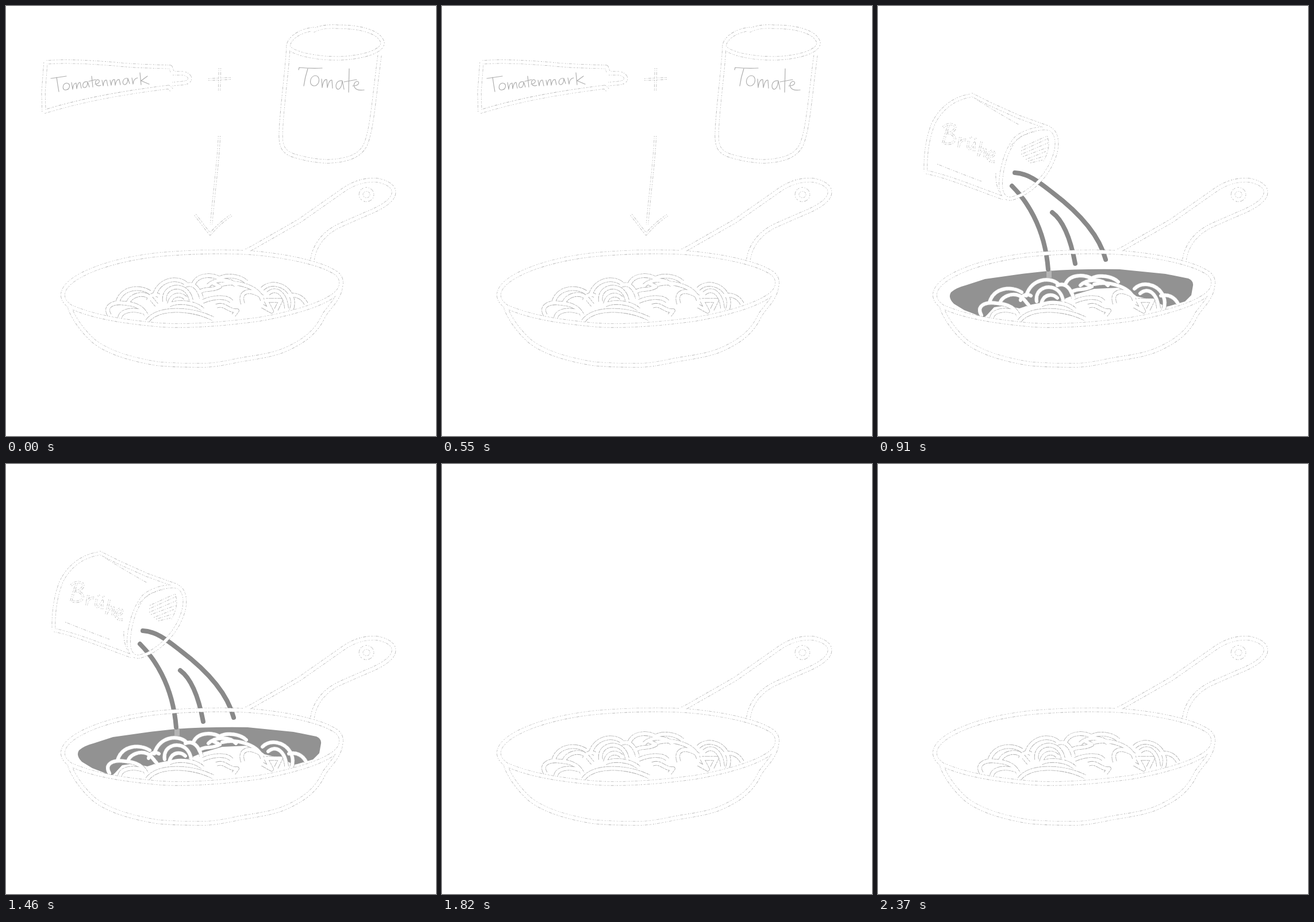
Write an HTML page that moves like this. It is 748 px wide and 748 px high and loops after 2730 ms.

```html
<!DOCTYPE html>
<html lang="de">
<head>
<meta charset="utf-8">
<title>Tomatensauce</title>
<style>
html, body { margin: 0; width: 100%; height: 100%; overflow: hidden; background: #fff; }
svg { display: block; width: 100vw; height: 100vh; }
path { fill: none; stroke-linejoin: round; stroke-linecap: round; }
.edge { stroke: #b6b6b6; stroke-linecap: butt; stroke-dasharray: 2 2 1 2 5 2 1 1 2 3; }
.noodles .edge { stroke: #a9a9a9; stroke-dasharray: 9 1 4 1; }
.core { stroke: #fff; }
.pen { stroke: #adadad; stroke-width: 1.2; }
.dots { stroke: #bcbcbc; stroke-width: 1; stroke-linecap: butt; stroke-dasharray: 2 2 5 2 1 3; }
.stream { stroke: #898989; stroke-width: 8; }
</style>
</head>
<body>
<svg viewBox="0 0 748 748">
  <g id="sauce">
    <path style="fill:#929292" d="M127 498 Q136 490 152 486 L186 475 L250 466 L295 461 Q350 457 420 458 L500 466 L540 474 Q549 478 548 486 L545 503 L534 514 L440 541 L300 553 L196 545 L176 539 L150 529 L132 518 Q121 507 127 498Z"/>
    <path style="fill:#fff" d="M176 550 L190 537 L202 524 L222 521 L246 526 L264 520 L284 516 L314 514 L342 502 L376 492 L420 490 L450 505 L480 512 L500 523 L530 521 L520 535 L300 558Z"/>
  </g>
  <g id="noodles" class="noodles"></g>
  <g id="flow"><rect x="293" y="460" width="9" height="13" fill="#b4b4b4"/></g>
  <g id="pan"></g>
  <g id="tomato"></g>
  <g id="broth"></g>
</svg>
<script>
const STEP = 910;
const NS = "http://www.w3.org/2000/svg";
const $ = id => document.getElementById(id);

function line(parent, d, cls, width) {
  const p = document.createElementNS(NS, "path");
  p.setAttribute("d", d);
  p.setAttribute("class", cls);
  if (width) p.setAttribute("stroke-width", width);
  parent.append(p);
}

// White brush stroke with a thin broken grey edge; overlaps merge.
function brush(id, width, paths) {
  for (const d of paths) line($(id), d, "edge", width + 1.6);
  for (const d of paths) line($(id), d, "core", width);
}

const pen = (id, cls, paths) => paths.forEach(d => line($(id), d, cls));

brush("noodles", 6, [
  "M180 538 C170 522 186 514 206 517 C224 518 238 524 244 538",
  "M194 516 C200 490 232 486 250 498",
  "M212 518 C214 506 232 498 246 504 C254 508 256 514 262 520",
  "M248 512 C250 502 260 500 266 504",
  "M258 504 C266 474 300 470 314 484",
  "M276 514 C272 490 300 482 314 496 Q320 502 322 512",
  "M284 518 C288 500 304 500 312 508",
  "M312 486 C326 480 336 492 340 508",
  "M326 484 C334 464 364 468 371 474 C384 466 408 470 418 480",
  "M336 498 C346 490 358 496 372 488 L360 482",
  "M352 486 C364 474 390 474 400 486",
  "M376 484 C402 478 440 488 446 512",
  "M412 518 C404 496 424 490 446 506",
  "M446 492 C460 478 484 484 494 500 C500 510 500 520 496 530",
  "M456 500 C470 488 486 500 488 526",
  "M492 504 C508 500 518 510 522 518",
  "M198 542 C200 530 220 526 238 532",
  "M246 548 C262 524 320 524 360 544",
  "M284 520 C300 512 330 516 342 528",
  "M342 514 C360 506 384 504 392 514",
  "M366 522 C380 516 388 532 402 530 L396 538",
  "M446 522 L462 531 L452 512 L478 512 L470 528"
]);

pen("flow", "stream", [
  "M238 290 C262 291 282 308 304 325 C345 356 384 395 396 441",
  "M233 313 C256 336 290 382 296 458",
  "M303 359 C322 373 335 405 343 448"
]);

brush("pan", 6, [
  "M418 426 C426 422 432 419 440 414 L510 374 L590 318 C612 304 630 302 645 303 C668 307 677 317 674 328 C670 342 645 354 630 360 L582 381 C553 394 537 416 533 441",
  "M636.5 328 A9.5 9 0 1 1 617.5 328 A9.5 9 0 1 1 636.5 328",
  "M111 525 C117 543 135 568 154 584 C180 604 220 615 262 622 C290 625 315 625 342 625 C362 625 382 621 400 617 C430 611 462 609 490 596 C520 582 540 566 552 540 C560 525 578 512 582 490",
  "M99 500 C104 470 180 441 270 432 C320 428 370 427 400 428 C470 430 550 446 576 466 C587 476 584 490 576 498 C560 515 510 533 440 545 C380 553 320 558 270 555 C200 549 150 540 112 523 C102 516 98 508 99 500Z"
]);

// Tube, plus sign, tin and arrow
brush("tomato", 5.5, [
  "M66 184 L65 150 L69 98 C110 95 150 98 190 101 C225 105 260 105 286 106 L290 116 M288 146 L283 141 C200 151 130 164 66 184",
  "M290 117 L309 117 C324 121 323 133 308 134 L288 136",
  "M536 40 C510 43 493 56 491 69 C493 82 540 92 582 91 C625 89 655 78 655 64 C651 46 620 36 576 36 C558 35 545 37 534 43",
  "M491 71 C489 115 479 180 478 225 C478 245 483 254 500 260 C525 268 550 271 565 270 C600 268 617 258 625 242 C637 215 640 160 650 86"
]);
brush("tomato", 2.6, [
  "M352 128 L391 126 M372 108 L371 148",
  "M371 226 C369 275 362 320 357 380",
  "M329 363 L355 397 Q372 377 392 364"
]);
pen("tomato", "pen", [
  // Tomatenmark
  "M78 126 Q92 124 105 122 M88 124 Q90 138 92 149",
  "M105 134 C97 136 98 147 104 146 C112 145 113 134 105 134",
  "M114 133 L116 145 Q117 134 122 134 L123 144 Q125 132 129 133 L131 143",
  "M142 132 C133 130 131 142 137 142 Q142 141 142 132 L145 141",
  "M149 122 L151 141 M144 131 L156 128",
  "M155 136 C164 135 164 128 159 128 C153 130 155 142 165 138",
  "M167 129 L169 139 Q170 128 175 129 L177 139",
  "M181 129 L183 138 Q184 127 189 128 L190 138 Q192 127 197 128 L199 137",
  "M212 126 C202 124 201 137 207 137 Q212 135 212 126 L215 135",
  "M219 125 L221 136 Q222 126 229 125",
  "M233 116 L235 137 M246 122 L235 130 L249 136",
  // Tomate
  "M509 111 L510 107 Q530 109 550 108 M525 109 Q520 124 518 139",
  "M538 121 C527 123 527 139 536 139 C547 138 547 121 538 121",
  "M549 127 L550 142 Q552 127 558 128 L559 142 Q562 128 567 129 L568 143",
  "M585 130 C573 128 571 144 578 145 Q584 143 585 130 L588 145",
  "M597 109 L596 150 M588 132 L610 128",
  "M603 139 C615 139 616 131 610 131 C602 134 603 149 623 146"
]);

// Broth tin
brush("broth", 5, [
  "M160 156 C130 161 108 180 96 205 C86 230 82 260 83 288",
  "M162 154 L198 172 L245 193 L298 212",
  "M84 289 C120 296 165 315 218 334",
  "M240 230 C256 216 285 210 300 214 C313 222 314 245 305 266 C293 298 262 328 232 335 C216 337 212 320 214 300 C217 270 227 245 240 230Z"
]);
pen("broth", "dots", [
  "M172 163 Q210 187 246 207", "M103 275 Q140 290 180 305",
  "M205 291 Q204 308 211 324", "M230 245 Q246 224 272 219",
  "M250 246 L292 227", "M249 252 L295 231", "M249 258 L296 238", "M252 262 L295 246",
  "M257 267 L292 253", "M261 270 L290 261", "M265 273 L286 268", "M294 226 Q302 244 288 270"
]);
// Brühe
brush("broth", 2.2, [
  "M123 207 Q118 222 113 239 M113 211 C124 201 139 206 133 215 Q129 220 122 221 C140 224 137 243 116 239",
  "M143 228 L140 246 Q143 231 153 233",
  "M158 235 C153 251 160 254 168 238 L167 254 M161 228 L162 230 M169 230 L170 232",
  "M180 236 L174 262 Q181 245 187 250 L185 264",
  "M191 262 C204 264 205 253 198 252 C188 255 187 272 203 271"
]);

function draw(ms) {
  const scene = Math.floor(ms / STEP) % 3;
  const show = (id, on) => { $(id).style.display = on ? "" : "none"; };
  show("tomato", scene === 0);
  for (const id of ["broth", "sauce", "flow"]) show(id, scene === 1);
}

let start;
function tick(now) {
  start ??= now;
  draw(Math.max(0, now - start));
  requestAnimationFrame(tick);
}
draw(0);
requestAnimationFrame(tick);
</script>
</body>
</html>
```
